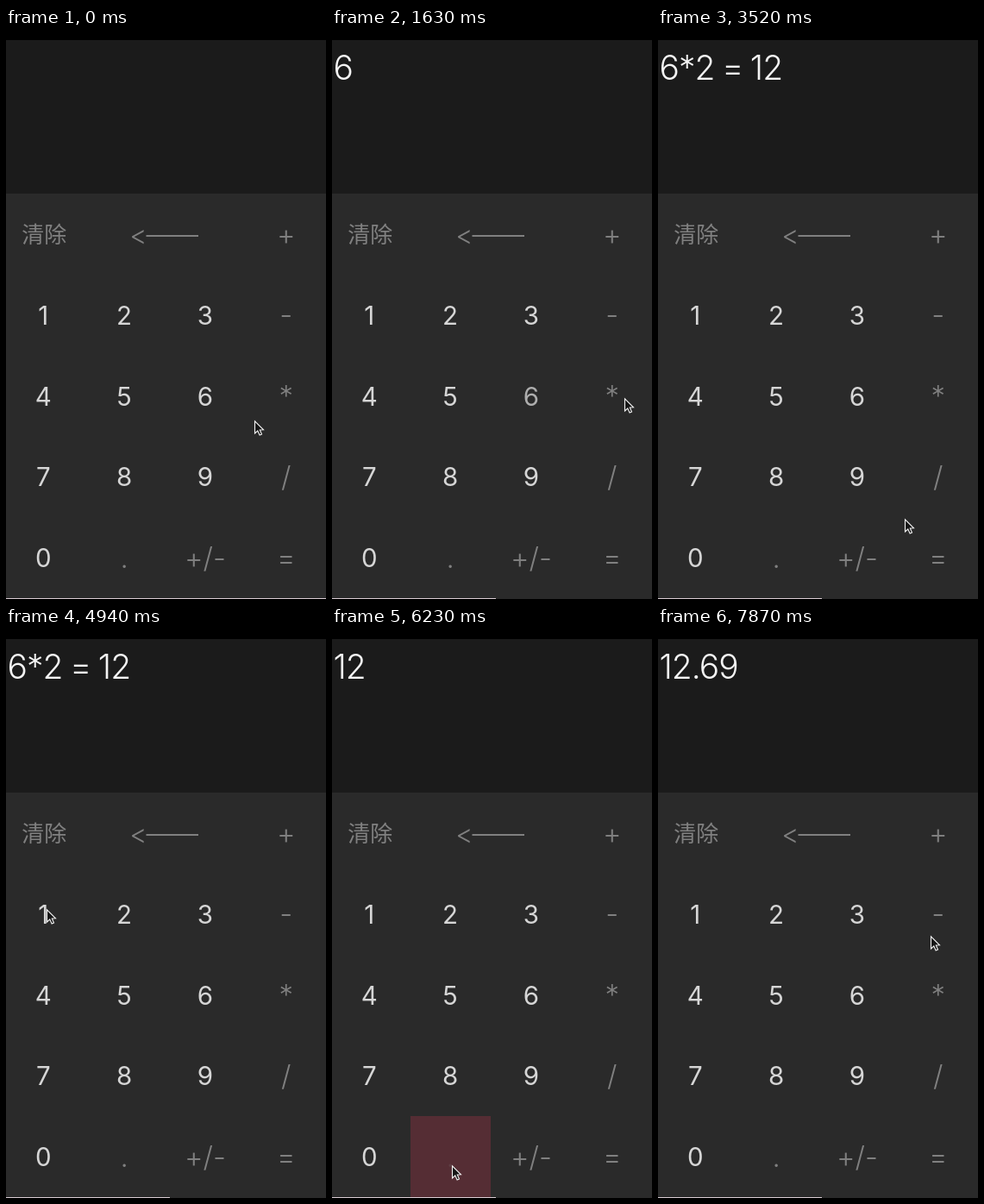
Write an HTML page with a canvas that moves like this. It is 371 px wide and 662 px high and loops after 7.99 s.

```html
<!DOCTYPE html>
<html lang="zh">
<head>
<meta charset="utf-8">
<title>Calculator</title>
<style>
html, body { margin: 0; width: 100%; height: 100%; overflow: hidden; background: #000; }
canvas { display: block; width: 371px; height: 662px; }
</style>
</head>
<body>
<canvas id="stage"></canvas>
<script>
const W = 371, H = 662, LOOP = 7990, STEPS = 68, STEP = LOOP / STEPS;
const CELL = 93.8, PAD_TOP = 192, GREY = '#808080';
const canvas = document.getElementById('stage');
const ctx = canvas.getContext('2d');
const dpr = window.devicePixelRatio || 1;
canvas.width = W * dpr;
canvas.height = H * dpr;

const rows = [['', '', '', '+'], ['1', '2', '3', '-'], ['4', '5', '6', '*'],
  ['7', '8', '9', '/'], ['0', '.', '+/-', '=']];

// The pointer rests at x, y from step `at` until step `leave`;
// a key is held for the last step of its rest.
const stop = (at, leave, x, y, key, lit) => ({ at, leave, x, y, key, lit });
const stops = [
  stop(0, 1, 288, 455),
  stop(7, 13, 243, 417, '6', true),
  stop(14, 17, 339, 429, '*'),
  stop(21, 24, 140, 332, '2', true),
  stop(27, 28, 332, 617, '='),
  stop(30, 30, 286, 569),
  stop(33, 33, 290, 478),
  stop(35, 35, 298, 519),
  stop(42, 44, 47, 327, '1', true),
  stop(46, 47, 126, 332, '2', true),
  stop(49, 49, 217, 500),
  stop(52, 54, 139, 624, '.', true),
  stop(57, 59, 240, 430, '6'),
  stop(61, 63, 223, 515, '9'),
  stop(67, 68, 316, 358)
];
const taps = stops.filter(s => s.key);

const smooth = k => k * k * (3 - 2 * k);

function pointerAt(n) {
  const i = stops.findIndex(s => n <= s.leave);
  const b = stops[i];
  if (n >= b.at) return [b.x, b.y];
  const a = stops[i - 1];
  const k = smooth((n - a.leave) / (b.at - a.leave));
  return [a.x + (b.x - a.x) * k, a.y + (b.y - a.y) * k];
}

// Replays the released keys: "=" shows the product, the next key starts afresh.
function readout(n) {
  let text = '', done = false;
  for (const { key, leave } of taps) {
    if (leave > n) break;
    if (key === '=') text += ' = ' + text.split('*').reduce((a, b) => a * b);
    else text = (done ? '' : text) + key;
    done = key === '=';
  }
  return text;
}

const isHeld = (tap, n) => n >= tap.leave - 1 && n < tap.leave;

// A held label is faint and recovers within two steps after release.
function labelAlpha(key, n) {
  const tap = taps.find(t => t.key === key && n >= t.leave - 1 && n < t.leave + 2);
  if (!tap) return 1;
  return isHeld(tap, n) ? 0.2 : 0.2 + 0.8 * Math.sin((n - tap.leave) * Math.PI / 4);
}

function rect(color, x, y, w, h) {
  ctx.fillStyle = color;
  ctx.fillRect(x, y, w, h);
}

function label(text, x, y, color, font, align = 'center') {
  ctx.font = font;
  ctx.fillStyle = color;
  ctx.textAlign = align;
  ctx.fillText(text, x, y);
}

function drawKey(key, col, row, n) {
  const center = 43.3 + col * CELL, y = PAD_TOP + row * CELL;
  if (taps.some(t => t.lit && t.key === key && isHeld(t, n))) {
    rect('#552d34', Math.round(center - 46), Math.round(y), 93, 94);
  }
  ctx.globalAlpha = labelAlpha(key, n);
  if (/\d/.test(key)) label(key, center, Math.round(y + 58), '#d6d6d6', '400 29.5px Inter, sans-serif');
  else label(key, center, y + 58.5, GREY, '350 33px Inter, sans-serif');
  ctx.globalAlpha = 1;
}

function drawPointer(x, y) {
  ctx.save();
  ctx.translate(x + 0.5, y + 0.8);
  ctx.beginPath();
  [[0, 0], [0, 14.2], [3.3, 11.2], [5.6, 16.2], [8, 15.1], [5.8, 10.2], [10, 10]]
    .forEach(p => ctx.lineTo(...p));
  ctx.closePath();
  ctx.fillStyle = '#161616';
  ctx.fill();
  ctx.strokeStyle = '#f2f2f2';
  ctx.lineWidth = 1.1;
  ctx.stroke();
  ctx.restore();
}

function draw(n) {
  ctx.setTransform(dpr, 0, 0, dpr, 0, 0);
  rect('#000', 0, 0, W, 14);
  rect('#1b1b1b', 0, 14, W, 178);
  rect('#2a2a2a', 0, PAD_TOP, W, H - PAD_TOP);

  ctx.letterSpacing = '-1px';
  ctx.wordSpacing = '-1.5px';
  label(readout(n), 1.5, 59.5, '#f4f4f4', '350 39px Inter, sans-serif', 'left');
  ctx.letterSpacing = ctx.wordSpacing = '0px';

  label('清除', 44.3, 249, GREY, '300 26px "Noto Sans CJK SC", "Noto Sans CJK", sans-serif');
  label('<', 153.5, 250.5, GREY, '350 31px Inter, sans-serif');
  rect(GREY, 162.5, 240, 60.5, 2);

  rows.forEach((keys, row) => keys.forEach((key, col) => {
    if (key) drawKey(key, col, row, n);
  }));
  // The light edge shortens after the first tap.
  rect('#d9cbd2', 0, 661, n < taps[0].leave ? W : 190, 1);
  drawPointer(...pointerAt(n));
}

function tick() {
  const t = performance.now() % LOOP;
  draw(Math.min(STEPS - 1, Math.floor((t + 20) / STEP)));
  requestAnimationFrame(tick);
}
tick();
</script>
</body>
</html>
```
